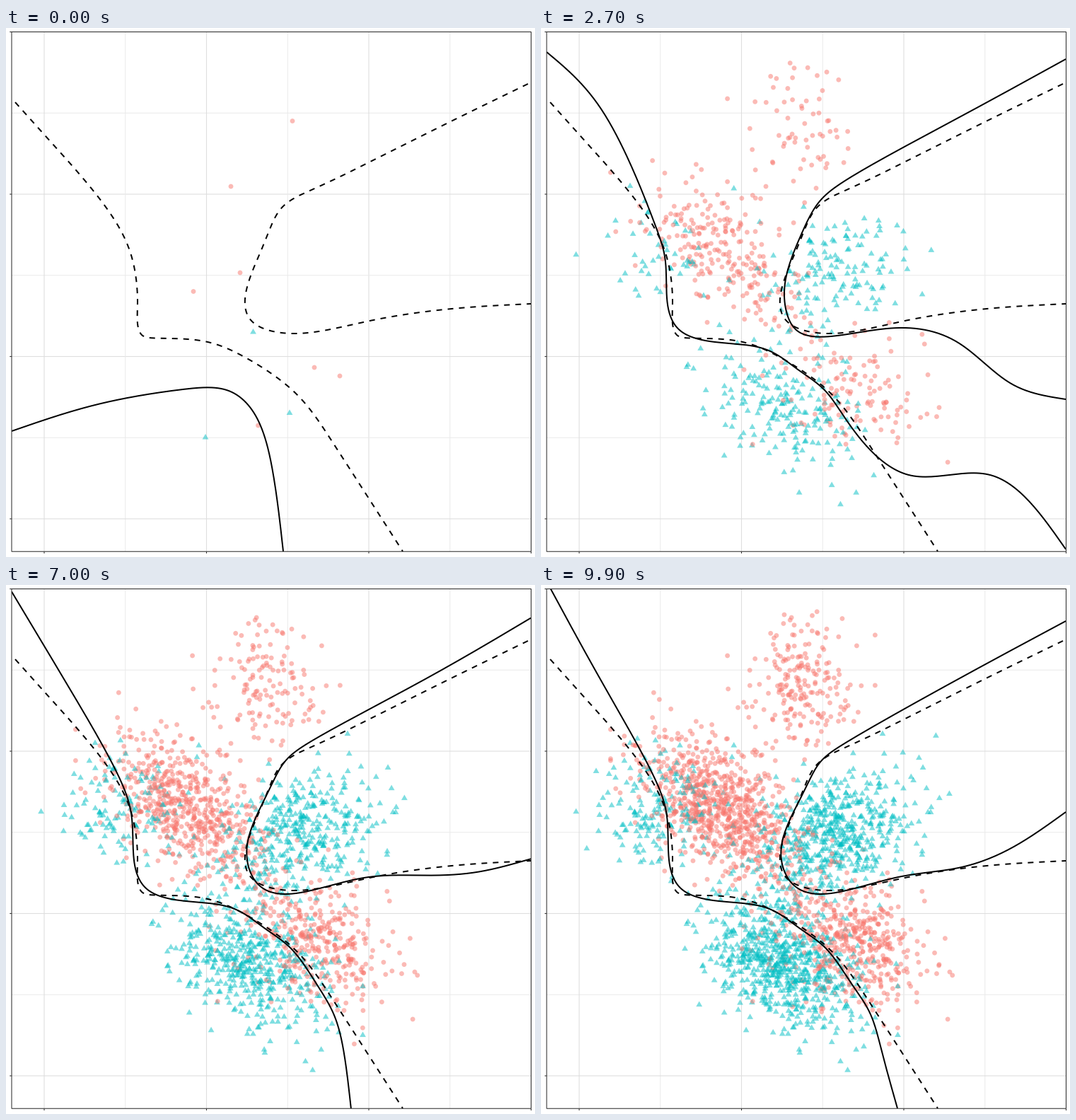
Animation, 748 px wide and 748 px high, one loop 10 s. Source, as a matplotlib script:

```python
import numpy as np
import matplotlib.pyplot as plt
from matplotlib.animation import FuncAnimation
from matplotlib.collections import PathCollection
from matplotlib.patches import Rectangle
from matplotlib.path import Path
from matplotlib.transforms import IdentityTransform

SIZE, DPI, FRAMES = 748, 100, 100
PX = 72 / DPI
FIRST, STEP = 10, 30
RED, CYAN = (0.973, 0.463, 0.427, 0.5), (0, 0.749, 0.769, 0.5)
X0, X1, Y0, Y1 = 8, 742.5, 5.5, 740.25
UNIT = 229.5


def count(frame):
    return FIRST + STEP * frame


def spline(points, n=300):
    """Natural cubic spline through points, centripetal parameter."""
    p = np.asarray(points, float)
    h = np.sqrt(np.hypot(*np.diff(p, axis=0).T))
    t = np.r_[0, np.cumsum(h)]
    m = np.eye(len(p))
    rhs = np.zeros_like(p)
    slope = np.diff(p, axis=0) / h[:, None]
    for i in range(1, len(p) - 1):
        m[i, i - 1:i + 2] = h[i - 1], 2 * (h[i - 1] + h[i]), h[i]
        rhs[i] = 6 * (slope[i] - slope[i - 1])
    c = np.linalg.solve(m, rhs)
    u = np.linspace(0, t[-1], n)
    k = np.clip(np.searchsorted(t, u) - 1, 0, len(h) - 1)
    a, b, w = (t[k + 1] - u)[:, None], (u - t[k])[:, None], h[k][:, None]
    return ((c[k] * a**3 + c[k + 1] * b**3) / (6 * w)
            + (p[k] / w - c[k] * w / 6) * a
            + (p[k + 1] / w - c[k + 1] * w / 6) * b)


# Fitted boundary: where data is dense it settles with the sample size,
# only the loose tails differ from fit to fit.
left_core = np.array([(163, 278), (179, 335), (182, 395), (200, 431), (250, 447),
                      (320, 457), (365, 485), (403, 514), (438, 562)])
right_core = np.array([(430, 232), (396, 256), (376, 292), (337, 365),
                       (340, 405), (365, 430), (410, 436)])
right_drift = np.array([(0, -24), (-8, -10), (-12, 0), (13, -13),
                        (12, 0), (0, 0), (0, 0)])


def fit(frame, top, foot, upper, lower):
    """Heights of the tails: top at x=8, 86; upper at 590, 742; lower at 505..742."""
    loose = count(12) / count(frame)
    left = [*zip((8, 86), top), *(left_core - 14 * loose**2), *foot]
    right = [*zip((742, 590), upper[::-1]),
             *(right_core + right_drift * loose**0.5),
             *zip((505, 590, 665, 742), lower)]
    return np.log(count(frame)), spline(left), spline(right)


fits = [
    fit(12, (55, 142), [(475, 575), (535, 632), (615, 740)],
        (135, 59), (447, 442, 444, 450)),
    fit(27, (34, 116), [(520, 632), (635, 632), (742, 737)],
        (127, 44), (424, 445, 503, 525)),
    fit(42, (55, 125), [(477, 624), (485, 665), (481, 740)],
        (142, 61), (421, 432, 456, 470)),
    fit(57, (58, 156), [(460, 606), (470, 655), (476, 740)],
        (129, 32), (416, 426, 453, 472)),
    fit(82, (-28, 130), [(465, 605), (483, 660), (497, 740)],
        (139, 58), (413, 400, 372, 322)),
    fit(99, (-5, 137), [(465, 605), (482, 660), (504, 740)],
        (133, 51), (413, 400, 372, 321)),
]
# The first fit has one branch only; the other waits outside the panel
arch = spline([(8, 570), (130, 532), (250, 511), (315, 513),
               (354, 550), (378, 632), (392, 740)])
fits.insert(0, (np.log(FIRST), arch, fits[0][2] + (400, 0)))


def branches(frame):
    s = np.log(count(frame))
    times = [f[0] for f in fits]
    i = min(max(np.searchsorted(times, s) - 1, 0), len(fits) - 2)
    (ta, *a), (tb, *b) = fits[i], fits[i + 1]
    u = (s - ta) / (tb - ta)
    return [p + (q - p) * u for p, q in zip(a, b)]


true_left = [(13, 105), (57, 154), (132, 241), (176, 318), (186, 385), (186, 418),
             (192, 434), (210, 438.5), (275, 442), (335, 464), (407, 514),
             (462, 586), (561, 740)]
true_right = [(738, 79), (595, 149), (445, 223), (390, 254), (366, 302), (339, 375),
              (348, 415), (410, 432), (512, 414.5), (630, 397), (742, 390)]

# Sample: each class is a mixture of blobs (share, x, y, sd x, sd y, correlation)
red_blobs = [(0.14, 368, 145, 36, 46, 0), (0.54, 255, 316, 54, 50, 0.5),
             (0.32, 435, 500, 52, 50, 0.3)]
cyan_blobs = [(0.13, 172, 315, 46, 40, 0), (0.38, 415, 352, 56, 45, -0.35),
              (0.49, 345, 535, 55, 48, 0.35)]
rng = np.random.default_rng(11)


def sample(blobs, n):
    share, x, y, sx, sy, rho = np.array(blobs).T
    k = rng.choice(len(blobs), size=n, p=share)
    u, v = np.clip(rng.normal(size=(2, n)), -2.9, 2.9)
    v = rho[k] * u + np.sqrt(1 - rho[k]**2) * v
    return np.column_stack([x[k] + sx[k] * u, y[k] + sy[k] * v])


total = count(FRAMES - 1)
is_red = rng.random(total) < 0.5
pts = np.where(is_red[:, None], sample(red_blobs, total), sample(cyan_blobs, total))
pts[:FIRST] = [(405, 131.5), (318, 224), (331, 346), (265, 372.5), (436, 480),
               (472, 492), (356.5, 562), (349.5, 430), (401, 544.5), (282, 579)]
is_red[:FIRST] = np.arange(FIRST) < 7

R = 3.4
circle = Path.circle((0, 0), R)
corners = np.radians([90, 210, 330, 90])
triangle = Path(1.5 * R * np.column_stack([np.cos(corners), np.sin(corners)]),
                closed=True)
shapes = [circle if r else triangle for r in is_red]
colors = np.where(is_red[:, None], RED, CYAN)

# Stage
fig = plt.figure(figsize=(SIZE / DPI, SIZE / DPI), dpi=DPI, facecolor="white")
ax = fig.add_axes([0, 0, 1, 1])
ax.set(xlim=(0, SIZE), ylim=(SIZE, 0))
ax.axis("off")


def rule(xs, ys, color, z):
    ax.plot(xs, ys, color=color, lw=1.07 * PX, zorder=z, snap=False,
            solid_capstyle="butt")


for i in range(7):
    x, y = X1 - UNIT / 2 * i, Y0 + UNIT / 2 * i
    shade = "#ebebeb" if i % 2 else "#dedede"
    rule([x, x], [Y0, Y1], shade, 1)
    rule([X0, X1], [y, y], shade, 1)
    if i % 2 == 0:
        rule([x, x], [Y1, Y1 + 2.75], "#333333", 6)
        rule([X0 - 2.75, X0], [y, y], "#333333", 6)

panel = Rectangle((X0, Y0), X1 - X0, Y1 - Y0, fill=False, ec="#333333",
                  lw=1.07 * PX, zorder=6, snap=False)
ax.add_patch(panel)

dots = PathCollection(shapes[:FIRST], offsets=pts[:FIRST], facecolors=colors,
                      linewidths=0, offset_transform=ax.transData, zorder=3)
dots.set_transform(IdentityTransform())
ax.add_collection(dots, autolim=False)

ink = dict(color="black", lw=2 * PX, zorder=5)
for curve in (true_left, true_right):
    ax.plot(*spline(curve).T, ls=(0, (4, 4)), dash_capstyle="butt", **ink)
lines = [ax.plot([], [], solid_capstyle="butt", **ink)[0] for _ in range(2)]
for line in lines:
    line.set_clip_path(panel)


def draw(frame):
    n = count(frame)
    dots.set_paths(shapes[:n])
    dots.set_offsets(pts[:n])
    dots.set_facecolor(colors[:n])
    for line, curve in zip(lines, branches(frame)):
        line.set_data(*curve.T)
    return [dots, *lines]


anim = FuncAnimation(fig, draw, frames=FRAMES, interval=100, repeat=True,
                     repeat_delay=0, blit=False)
plt.show()
```
